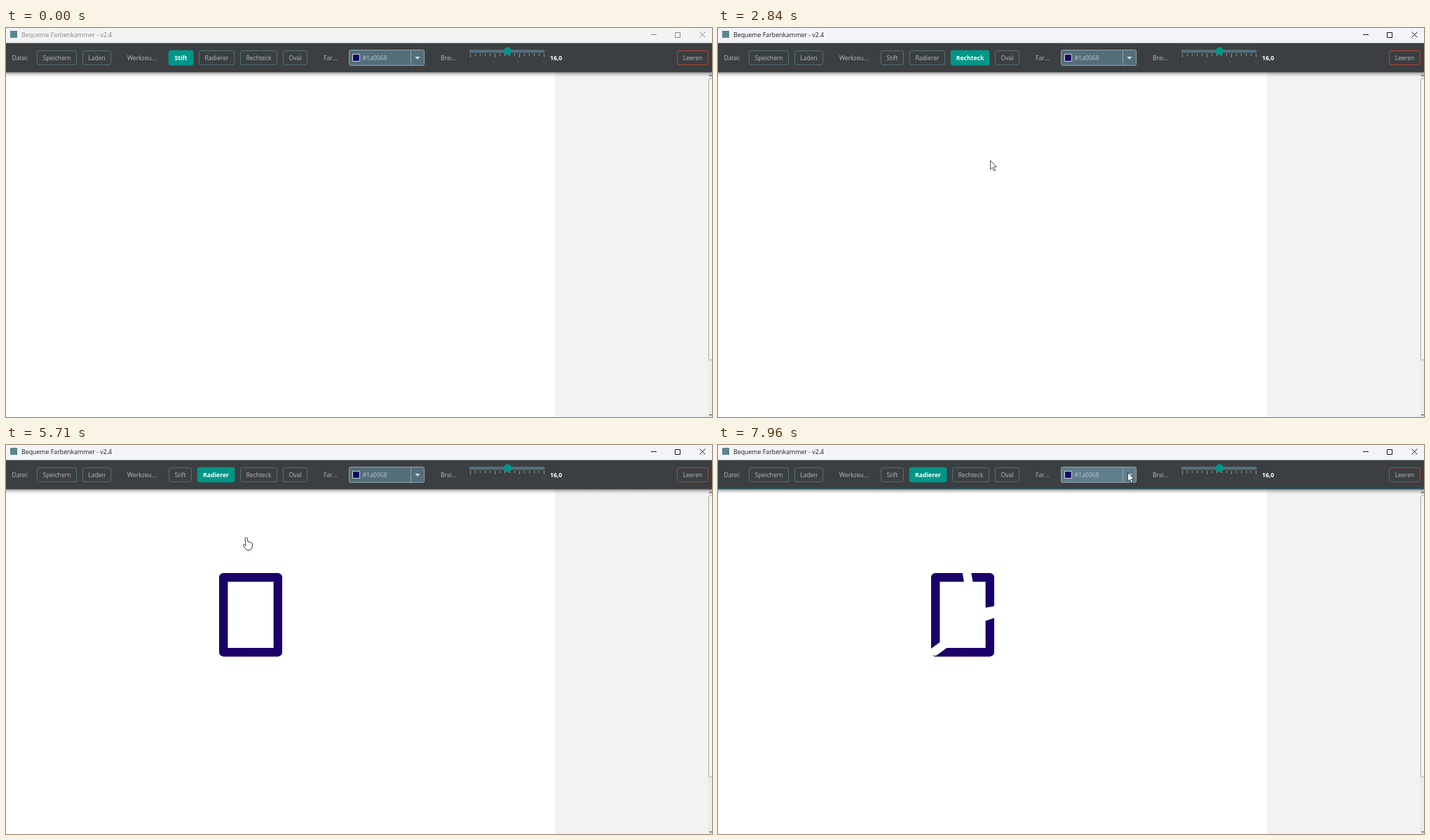
An HTML page with a canvas for the animation above (8 s loop, 1007x556 px).

```html
<!DOCTYPE html>
<html lang="de">
<head>
<meta charset="utf-8">
<style>
html, body { margin: 0; width: 100%; height: 100%; overflow: hidden; background: #fff; }
canvas { display: block; width: 1007px; height: 556px; }
</style>
</head>
<body>
<canvas id="stage" width="1007" height="556"></canvas>
<script>
const g = document.getElementById('stage').getContext('2d');
const LOOP = 8000, STEP = 78, PEN = 12.4;
const INK = '#1a0068', TEAL = '#009688', SLATE = '#546e7a', LABEL = '#b4bcc0';
const FONT = '"Open Sans", "Noto Sans", sans-serif';

// Each pointer move starts where the last one ended and slows down by its own power
let last = [1243, 757];
function move(start, end, power, ...points) {
  const m = { start, end, power, path: [last, ...points] };
  last = points[points.length - 1];
  return m;
}
const enter = move(210, 440, 2, [471, 263]);
const toRect = move(670, 1130, 2, [355, 48]);
const toCanvas = move(1820, 2140, 5, [392, 160]);
const aim = move(2460, 2840, 1.5, [391, 195], [388, 189]);
const drag = move(3300, 3780, 1.24, [315, 259], [310, 296]);
const toEraser = move(4080, 4540, 2, [324, 150], [308, 41]);
const back = move(5470, 5710, 2, [343, 133]);
const eraseA = move(6080, 6870, 1.37, [355, 183], [365, 242], [446, 227], [399, 239]);
const eraseB = move(6950, 7190, 2, [375, 247], [309, 295]);
const toCombo = move(7490, 7960, 1.3, [575, 1], [584, 39]);
const moves = [enter, toRect, toCanvas, aim, drag, toEraser, back, eraseA, eraseB, toCombo];

const within = (t, a, b) => t >= a && t < b;

// Progress 0..1, held between screen updates
function progress(m, t) {
  if (t < m.start) return 0;
  const steps = Math.round((m.end - m.start) / STEP) + 1;
  const done = Math.floor((t - m.start) / (m.end - m.start) * (steps - 1) + 0.02) + 1;
  return Math.min(1, done / steps);
}

function pointAt(m, p) {
  const segments = m.path.length - 1;
  const u = (1 - (1 - Math.max(0, p)) ** m.power) * segments;
  const i = Math.min(Math.floor(u), segments - 1);
  return [0, 1].map(c => m.path[i][c] + (m.path[i + 1][c] - m.path[i][c]) * (u - i));
}

function text(s, x, y, { color = LABEL, size = 8.65, weight = 400, align = 'left' } = {}) {
  g.font = `${weight} ${size}px ${FONT}`;
  g.fillStyle = color;
  g.textAlign = align;
  g.fillText(s, x, y);
}

function rect(x, y, w, h, color) {
  g.fillStyle = color;
  g.fillRect(x, y, w, h);
}

function box(x, y, w, h, r, fill, stroke) {
  g.beginPath();
  g.roundRect(x + 0.5, y + 0.5, w - 1, h - 1, r);
  if (fill) { g.fillStyle = fill; g.fill(); }
  if (stroke) { g.strokeStyle = stroke; g.lineWidth = 1; g.stroke(); }
}

function disc(x, y, r, color) {
  g.fillStyle = color;
  g.beginPath();
  g.arc(x, y, r, 0, 7);
  g.fill();
}

function shape(d, fill, stroke, width = 1) {
  const p = new Path2D(d);
  if (fill) { g.fillStyle = fill; g.fill(p); }
  if (stroke) { g.strokeStyle = stroke; g.lineWidth = width; g.stroke(p); }
}

function button(label, x, w, { selected, hover, border = '#4f6f79' } = {}) {
  if (selected) box(x - 0.3, 31.7, w + 0.8, 21.8, 2.5, TEAL, TEAL);
  else box(x, 32, w, 21, 2.5, hover && '#4d565c', hover ? '#78909c' : border);
  text(label, x + w / 2, 46, { color: selected ? '#fff' : LABEL, weight: selected ? 700 : 400, align: 'center' });
}

// The selected tool is a little wider because its label is bold
function toolButtons(tool) {
  let x = 232;
  return [['Stift', 33], ['Radierer', 51], ['Rechteck', 53], ['Oval', 35]].map(([label, base]) => {
    const selected = label === tool, b = { label, x, w: base + (selected ? 2 : 0), selected };
    x += b.w + 8;
    return b;
  });
}

function drawTitle(active) {
  rect(0, 0, 1007, 21.5, active ? '#f3f4f8' : '#f3f3f3');
  rect(6, 4, 10, 10, '#5b8791');
  const color = active ? '#1a1a1a' : '#858585';
  text('Bequeme Farbenkammer - v2.4', 22, 13, { color, size: 8.8 });
  shape('M920 9.5h8M954.5 6.5h7v7h-7zM989.5 5.5l8 8M997.5 5.5l-8 8', null, color);
}

function drawSlider() {
  box(660, 30.5, 109, 5.5, 2, SLATE);
  for (let i = 0; i <= 15; i++) {
    const major = i % 5 === 0, x = 662 + i * 7;
    rect(x, 37, 1, major ? 5 : 3, '#979c9f');
    if (major) text(i * 2 + (i < 15), x, 51, { color: '#4e5356', size: 6.8, align: 'center' });
  }
  disc(715.5, 33, 5.7, TEAL);
  text('16,0', 776, 46, { color: '#fff', weight: 700 });
}

function drawToolbar(buttons, mouse, focus) {
  const shade = g.createLinearGradient(0, 63, 0, 70);
  shade.addColorStop(0, 'rgba(0,0,0,.5)');
  shade.addColorStop(0.4, 'rgba(0,0,0,.17)');
  shade.addColorStop(1, 'rgba(0,0,0,0)');
  rect(0, 63, 1007, 7, shade);
  rect(0, 21, 1007, 42, '#3c3f41');
  if (focus) rect(0, 62, 1007, 1, '#155a6b');
  text('Datei:', 8.5, 46);
  button('Speichern', 44, 57);
  button('Laden', 109, 41);
  text('Werkzeu...', 173, 46);
  for (const b of buttons) button(b.label, b.x, b.w, { selected: b.selected, hover: b === mouse.button });
  text('Far...', 453, 46);
  box(489, 31, 108, 23, 2, mouse.combo ? '#607d8b' : SLATE, '#90a4ae');
  rect(577, 32, 1, 21, '#90a4ae');
  box(494, 37, 11, 11, 0, INK, '#c9d2d6');
  text('#1a0068', 508.5, 46, { color: '#b9c5ca' });
  shape('M583.5 41h7l-3.5 4z', '#d5dde0');
  text('Brei...', 620, 46);
  drawSlider();
  button('Leeren', 957, 45, { border: '#b0443a' });
}

function drawScroll() {
  rect(783, 63, 224, 493, '#f2f2f2');
  rect(1001, 63, 6, 493, '#ececec');
  box(1002, 72, 8, 403, 2, '#f6f6f6', '#adadad');
  shape('M1002 69l3-3l3 3zM1002 552l3 3l3-3z', '#8a8a8a');
}

function drawPicture(t) {
  const p = progress(drag, t);
  if (!p) return;
  const [x, y] = pointAt(drag, p - 0.04 * (1 - p)); // the shape trails the pointer slightly
  g.lineJoin = g.lineCap = 'round';
  g.lineWidth = PEN;
  g.strokeStyle = INK;
  g.strokeRect(x + 0.2, 189.2, 387.6 - x, y - 189);

  g.strokeStyle = '#fff';
  for (const m of [eraseA, eraseB]) {
    const end = progress(m, t);
    if (!end) continue;
    g.beginPath();
    for (let i = 0; i <= 80; i++) g.lineTo(...pointAt(m, end * i / 80));
    g.stroke();
  }
  g.lineCap = 'butt';
}

function drawPointer(kind, x, y) {
  g.save();
  g.translate(x, y);
  g.lineJoin = 'round';
  if (kind === 'cross') {
    rect(-9, 0, 19, 1, '#000');
    rect(0, -9, 1, 19, '#000');
  } else if (kind === 'hand') {
    shape('M-2 1Q-2-.6-.4-.6Q1.2-.6 1.4 1L2 5.3L6.5 6.3Q8.8 7 8.7 9.5L8 13.5Q7 17.5 3 17.7' +
      'Q0 17.8-1.6 15L-4.6 10.8Q-5 9.2-3.2 9.3L-1 10.8Z', '#fff', '#222', 0.9);
  } else {
    shape('M.5.5V13L3.4 10.3L5.5 15.2L7.6 14.3L5.5 9.5H9.4Z', '#fff', '#222', 0.8);
  }
  g.restore();
}

function draw(t) {
  const tool = t < 1520 ? 'Stift' : t < 5250 ? 'Rechteck' : 'Radierer';
  const pressed = within(t, 1440, 1680) || within(t, 3070, 3780) || within(t, 5020, 5250) || within(t, 5940, 7190);
  const focus = within(t, 3070, 5020) || t >= 5940;
  const current = moves.filter(m => m.start <= t).pop();
  const [x, y] = current ? pointAt(current, progress(current, t)) : [-99, -99];
  const buttons = toolButtons(tool);
  const mouse = {
    button: buttons.find(b => within(x, b.x, b.x + b.w) && within(y, 32, 53)),
    combo: within(x, 489, 597) && within(y, 31, 54)
  };

  rect(0, 0, 1007, 556, '#fff');
  drawPicture(t);
  drawScroll();
  drawToolbar(buttons, mouse, focus);
  drawTitle(t >= 1440);

  const onCanvas = y >= 63 && x < 783;
  const kind = mouse.button || onCanvas && tool === 'Radierer' ? 'hand'
    : onCanvas && tool === 'Stift' ? 'cross' : 'arrow';
  drawPointer(kind, x, y);
  if (pressed) disc(x, y, 11.5, 'rgba(255,250,0,.5)');
}

const begin = performance.now();
function tick() {
  draw((performance.now() - begin) % LOOP);
  requestAnimationFrame(tick);
}
tick();
</script>
</body>
</html>
```
